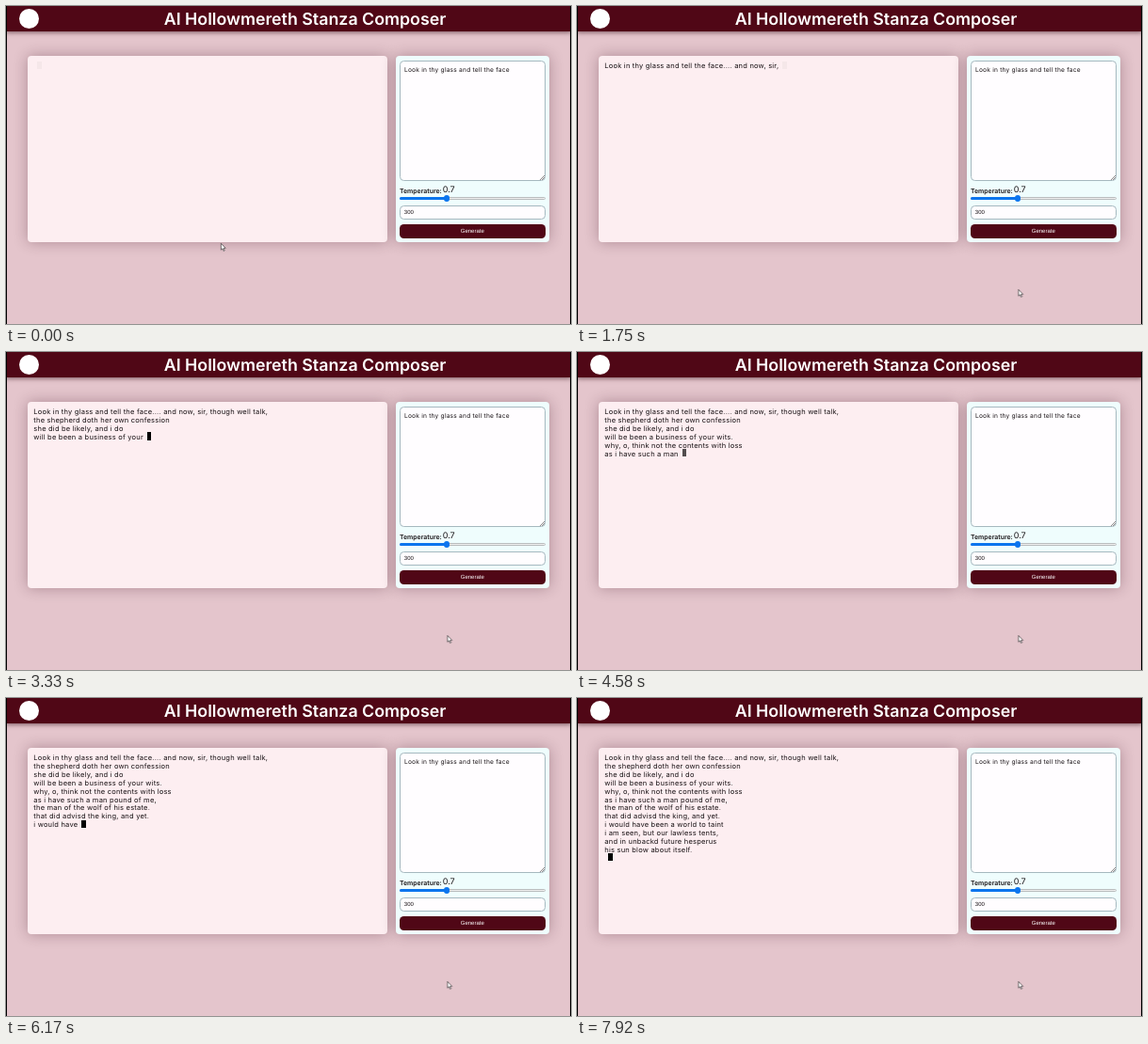
These frames come from a looping animation (600 px wide and 338 px high, 8000 ms). An HTML page:

```html
<!DOCTYPE html>
<html lang="en">
<head>
<meta charset="utf-8">
<title>Sonnet generator</title>
<style>
  * { box-sizing: border-box; }
  html, body { margin: 0; width: 100%; height: 100%; overflow: hidden; }
  body {
    position: relative;
    background: #e4c5cc;
    color: #171114;
    font: 400 7.5px Inter, "Open Sans", sans-serif;
    text-rendering: geometricPrecision;
  }
  body > *, .panel > * { position: absolute; }
  .edges { inset: 0; border: solid #000; border-width: 0 1px; }
  header {
    left: 0; top: 0; width: 600px; height: 27px;
    background: #500716;
    box-shadow: 0 1px 5px rgba(40, 0, 10, .6);
  }
  .badge {
    position: absolute; left: 13.5px; top: 2.5px;
    width: 21px; height: 21px; border-radius: 50%; background: #fff;
  }
  h1 {
    position: absolute; left: 17.5px; top: 1px; width: 600px; margin: 0;
    text-align: center; white-space: nowrap; color: #fff;
    font-size: 17.8px; font-weight: 600; line-height: 27px;
  }
  .panel {
    top: 53px; height: 198px; border-radius: 4px;
    box-shadow: 0 0 15px rgba(60, 20, 35, .32);
  }
  .output { left: 23px; width: 382px; background: #fdeef1; }
  .form { left: 414px; width: 163px; background: #effdfd; }
  #poem {
    left: 6.3px; top: 7.3px; white-space: pre;
    line-height: 8.84px; letter-spacing: .22px;
  }
  #caret {
    position: relative; top: -1.4px;
    display: inline-block; vertical-align: top;
    width: 4.7px; height: 8.2px; margin-left: 3.8px; background: #000;
  }
  .field {
    left: 4px; width: 154.5px;
    border: 1px solid #a5b8bf; border-radius: 4.5px; background: #fffdff;
  }
  .prompt {
    top: 4.5px; height: 128px; padding: 5.2px 4px;
    font-size: 6.6px; line-height: 8px; letter-spacing: .22px; white-space: nowrap;
  }
  .prompt::after {
    content: ""; position: absolute; right: 0; bottom: 0; width: 5px; height: 5px;
    background: linear-gradient(135deg, transparent 45%, #888 45% 55%, transparent 55% 70%, #888 70% 80%, transparent 80%);
  }
  .label { left: 4px; top: 138.6px; line-height: 10px; font-size: 6.9px; font-weight: 600; white-space: nowrap; }
  .value { left: 49.7px; top: 137.5px; line-height: 10px; font-size: 9px; }
  .track, .fill { left: 4px; top: 149.6px; height: 3.2px; border-radius: 2px; }
  .track { width: 154.5px; border: .6px solid #b9bcbd; background: #efefef; }
  .fill { width: 50px; background: #0b75ee; }
  .thumb { left: 50.7px; top: 147.8px; width: 6.8px; height: 6.8px; border-radius: 50%; background: #0b75ee; }
  .number, .button { font: 6px "Liberation Sans", Arial, sans-serif; }
  .number { top: 158.8px; height: 15.4px; padding: 0 3.8px; line-height: 15px; }
  .button {
    left: 4px; top: 179px; width: 154.5px; height: 14.6px; line-height: 16px;
    border-radius: 4.5px; background: #500716; color: #fff; text-align: center;
  }
  .pointer {
    left: -1px; top: -.4px; width: 6px; height: 9px; overflow: visible;
    animation: wander 8s linear infinite;
  }
  @keyframes wander {
    0%, 11.4% { transform: translate(228.9px, 252px); }
    15.5% { transform: translate(370px, 316px); }
    20%, 100% { transform: translate(469.4px, 301px); }
  }
</style>
</head>
<body>
<header>
  <div class="badge"></div>
  <h1>AI Hollowmereth Stanza Composer</h1>
</header>
<div class="edges"></div>

<section class="panel output">
  <div id="poem"><span id="words"></span><span id="caret"></span></div>
</section>

<section class="panel form">
  <div class="field prompt">Look in thy glass and tell the face</div>
  <div class="label">Temperature:</div>
  <div class="value">0.7</div>
  <div class="track"></div>
  <div class="fill"></div>
  <div class="thumb"></div>
  <div class="field number">300</div>
  <div class="button">Generate</div>
</section>

<svg class="pointer" viewBox="0 0 6 9">
  <path d="M.4 .3V7.2L2 5.8 3.1 8.4 4.2 7.9 3.1 5.4H5.2Z" fill="#fff" stroke="#222" stroke-width=".6"/>
</svg>

<script>
const LOOP = 8000;
const STEP = 1000 / 12;
const BLINK = 585;

const poem = `Look in thy glass and tell the face.... and now, sir, though well talk,
the shepherd doth her own confession
she did be likely, and i do
will be been a business of your wits.
why, o, think not the contents with loss
as i have such a man pound of me,
the man of the wolf of his estate.
that did advisd the king, and yet.
i would have been a world to taint
i am seen, but our lawless tents,
and in unbackd future hesperus
his sun blow about itself.
`;
const tokens = poem.match(/ ?[a-z]+|[.,]|\n/gi);

// [step, tokens shown]: the prompt lands at once, then words stream in
const pace = [[16, 11], [21, 17], [40, 45], [55, 65], [74, 93], [84, 107], [95, 122]];

const words = document.getElementById("words");
const caret = document.getElementById("caret");

function tokensAt(step) {
  if (step < pace[0][0]) return 0;
  const next = pace.findIndex(([s]) => s > step);
  if (next < 0) return tokens.length;
  const [s0, n0] = pace[next - 1];
  const [s1, n1] = pace[next];
  return Math.floor(n0 + (n1 - n0) * (step - s0) / (s1 - s0));
}

function caretOpacity(step) {
  const phase = step * STEP / BLINK % 1;
  return Math.max(.03, Math.min(1, phase / .4, (.97 - phase) / .2));
}

let start;
function render(now) {
  start ??= now;
  const step = Math.floor(((now - start) % LOOP + 5) / STEP) % 96;
  words.textContent = tokens.slice(0, tokensAt(step)).join("");
  caret.style.opacity = caretOpacity(step);
  requestAnimationFrame(render);
}
requestAnimationFrame(render);
</script>
</body>
</html>
```
